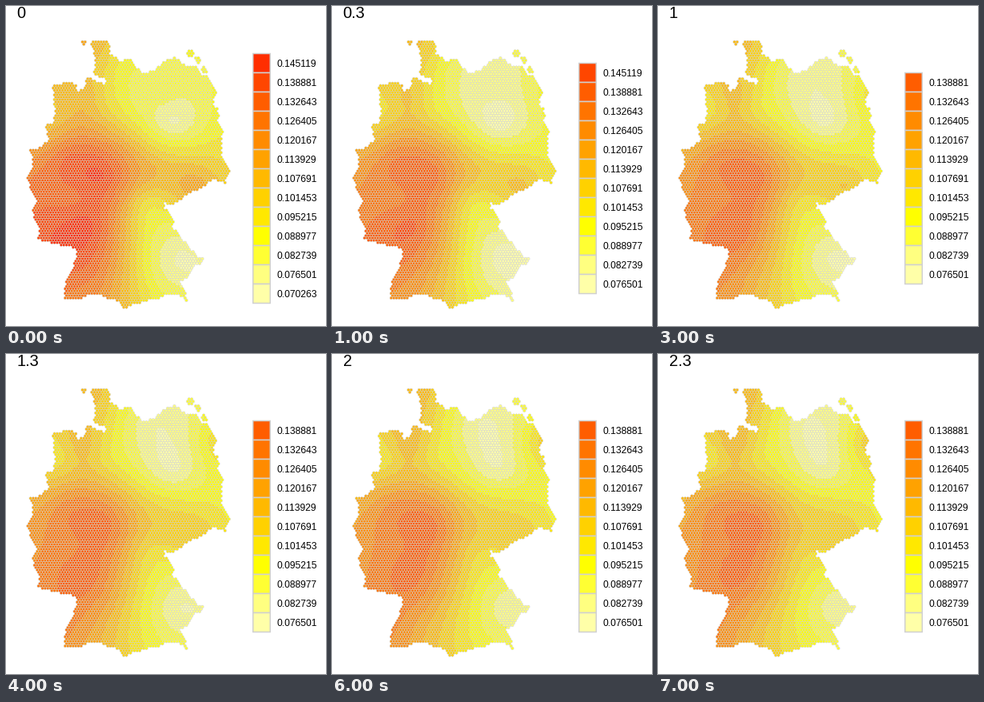
A matplotlib script that plays this animation: 400x400 px, repeating every 8 s.

```python
import numpy as np
import matplotlib.pyplot as plt
from matplotlib.animation import FuncAnimation
from matplotlib.collections import PolyCollection
from matplotlib.patches import Rectangle
from matplotlib.path import Path

SIZE, DPI = 400, 100
FRAMES, INTERVAL = 8, 1000
PX = 72 / DPI
BORDER = "#d0d0d0"
CELL_W = 3.33
LOWEST, CLASS_STEP = 0.070263, 0.006238

# Corners of the border, clockwise from the north; coast() roughens the sides
CORNERS = [
    (104, 45), (130, 45), (129, 58), (140, 65), (142, 70), (156, 68), (170, 85),
    (183, 82), (198, 70), (213, 65), (222, 72), (238, 76), (255, 91), (263, 110),
    (258, 122), (268, 138), (265, 147), (271, 157), (271, 190), (279, 207),
    (274, 221), (258, 216), (245, 228), (203, 249), (199, 245), (198, 252),
    (210, 268), (207, 276), (222, 294), (246, 316), (236, 325), (230, 338),
    (218, 344), (226, 369), (213, 361), (163, 372), (149, 379), (138, 367),
    (115, 360), (72, 367), (73, 350), (90, 305), (62, 297), (40, 291),
    (43, 278), (32, 256), (39, 248), (26, 214), (33, 203), (28, 179), (41, 179),
    (53, 165), (49, 150), (60, 146), (62, 128), (57, 97), (83, 94), (91, 108),
    (103, 89), (127, 101), (123, 91), (109, 86), (112, 65),
]
ISLANDS = [(231, 59, 4), (240, 67, 4), (248, 80, 4), (97, 47, 3)]

# x, y, class level at the start and at the end
SITES = [
    (115, 50, 6, 7), (143, 78, 3.2, 4.4), (180, 85, 2.2, 1.6),
    (200, 118, 1.7, 1.2), (208, 145, 0.4, 1.7), (240, 80, 2.3, 3.4),
    (258, 112, 2.5, 5.8), (262, 150, 3, 4.4), (160, 120, 2.4, 3.1),
    (125, 130, 4.8, 5), (95, 115, 6.4, 7.2), (66, 130, 5.6, 4.8),
    (52, 165, 7, 7), (205, 182, 4.2, 4.8), (272, 205, 4.8, 4.5),
    (235, 228, 7, 6.2), (180, 205, 6.9, 6.4), (33, 200, 9, 8.2),
    (75, 190, 10.6, 9.7), (122, 212, 11.5, 11), (85, 240, 10.2, 10.3),
    (45, 285, 11.2, 9.4), (100, 275, 12, 11), (78, 355, 9.6, 9.4),
    (118, 345, 8.8, 7.4), (148, 300, 6.6, 7), (175, 248, 4, 6.1),
    (180, 325, 2.6, 4), (218, 315, 0.3, 2), (220, 360, 1.8, 3.3),
]


def heat_colors(warm=12):
    """Red to yellow in equal steps, then three paler yellows."""
    reds = [(1, g, 0) for g in np.linspace(0, 1, warm)]
    return np.array(reds + [(1, 1, b) for b in (0.2, 0.5, 0.66)])


def coast(points, rounds=2, rough=0.06):
    """Split every side in the middle and push the new point sideways."""
    rng = np.random.default_rng(4)
    pts = np.array(points, float)
    for _ in range(rounds):
        side = np.roll(pts, -1, axis=0) - pts
        normal = np.c_[-side[:, 1], side[:, 0]]
        mid = pts + side / 2 + normal * rng.normal(0, rough, (len(pts), 1))
        pts = np.stack([pts, mid], axis=1).reshape(-1, 2)
    return pts


def hex_centers():
    ys = np.arange(42, 380, CELL_W * np.sqrt(3) / 2)
    xs = np.arange(24, 284, CELL_W)
    x, y = np.meshgrid(xs, ys)
    x[1::2] += CELL_W / 2
    pts = np.c_[x.ravel(), y.ravel()]
    inside = Path(coast(CORNERS)).contains_points(pts)
    for cx, cy, r in ISLANDS:
        inside |= np.hypot(pts[:, 0] - cx, pts[:, 1] - cy) < r
    return pts[inside]


def kernel(a, b):
    d2 = ((a[:, None] - b[None]) ** 2).sum(-1)
    return d2 * np.log(d2 + 1e-9)


def spline(at):
    """Thin-plate spline through the sites: start and end level per point."""
    data = np.array(SITES)
    pts, vals, at = data[:, :2] / 100, data[:, 2:], at / 100
    n = len(pts)
    plane = np.c_[np.ones(n), pts]
    system = np.block([[kernel(pts, pts), plane], [plane.T, np.zeros((3, 3))]])
    coef = np.linalg.solve(system, np.r_[vals, np.zeros((3, 2))])
    return np.c_[kernel(at, pts), np.ones(len(at)), at] @ coef


def level_range(step):
    if step == 0:
        return 0, 12
    return 1, 12 if step < 3 else 11


def levels_at(step):
    ease = (step / (FRAMES - 1)) ** 0.6
    mix = START + (END - START) * ease
    return np.clip(np.rint(mix), *level_range(step)).astype(int)


COLORS = heat_colors()
centers = hex_centers()
START, END = spline(centers).T

fig = plt.figure(figsize=(SIZE / DPI, SIZE / DPI), dpi=DPI, facecolor="white")
ax = fig.add_axes([0, 0, 1, 1])
ax.set_xlim(0, SIZE)
ax.set_ylim(SIZE, 0)
ax.axis("off")

angles = np.radians(np.arange(30, 390, 60))
hexagon = CELL_W / np.sqrt(3) * np.c_[np.cos(angles), np.sin(angles)]
cells = PolyCollection(centers[:, None] + hexagon, edgecolors=BORDER,
                       linewidths=0.5 * PX)
ax.add_collection(cells)

font = dict(family="Liberation Sans", color="black", va="baseline")
title = ax.text(13.7, 15, "", fontsize=20 * PX, **font)
keys = []
for _ in range(13):
    box = Rectangle((308.75, 0), 21.5, 24, ec=BORDER, lw=1.5 * PX, snap=False)
    label = ax.text(338.5, 0, "", fontsize=12 * PX, **font)
    keys.append((ax.add_patch(box), label))


def draw(step):
    low, high = level_range(step)
    palest = 14 if step == 0 else 15
    palette = COLORS[palest - np.arange(13) - (step > 0) * 0] if step == 0 \
        else COLORS[np.minimum(palest - np.arange(13), 14)]
    title.set_text(f"{round(step / 3, 1):g}")
    cells.set_facecolor(palette[levels_at(step)])
    top = 215.5 - 12 * (high - low)
    for i, (box, label) in enumerate(keys):
        level = high - i
        shown = level >= low
        box.set_visible(shown)
        label.set_visible(shown)
        if shown:
            mid = top + 24 * i
            box.set_y(mid - 12)
            box.set_facecolor(palette[level])
            label.set_y(mid + 4.5)
            label.set_text(f"{LOWEST + CLASS_STEP * level:.6f}")
    return [cells, title]


anim = FuncAnimation(fig, draw, frames=FRAMES, interval=INTERVAL,
                     init_func=lambda: draw(0), repeat=True, repeat_delay=0)
plt.show()
```
